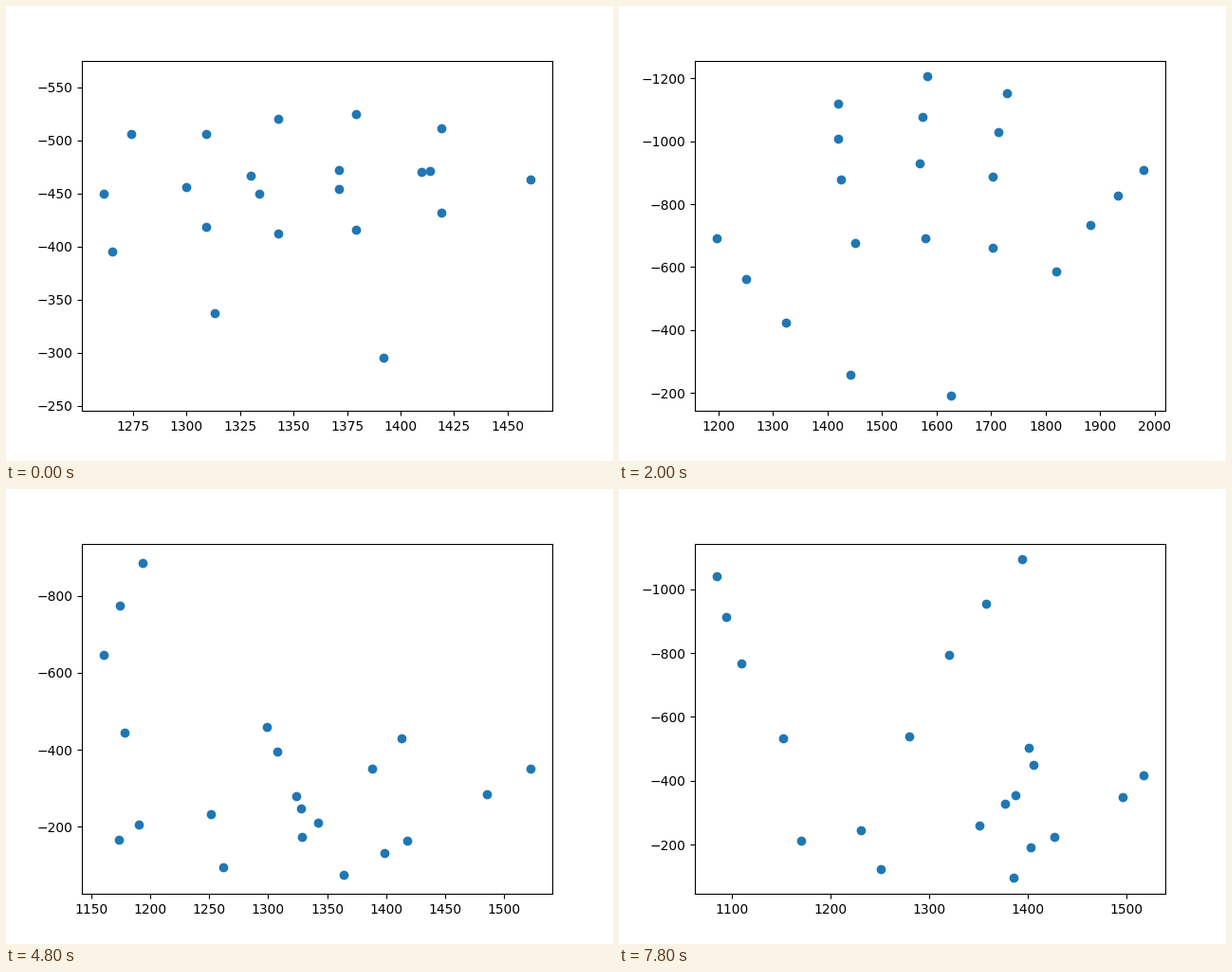
Animation, 640 px wide and 480 px high, one loop 8000 ms. Source, as a matplotlib script:

```python
import numpy as np
import matplotlib.pyplot as plt
from matplotlib.animation import FuncAnimation

FRAMES, STEP_MS = 40, 200

# Spacing of the four fingers from index (0) to little finger (1)
FIST, KNUCKLES, SPLAY = (0, .31, .64, 1), (0, .35, .68, 1), (0, .29, .55, 1)


def row(first, last, arch, spacing):
    """Four points in a line, the middle two raised by arch."""
    u = np.array(spacing)[:, None]
    return np.array(first) * (1 - u) + np.array(last) * u + np.outer((0, 1, 1, 0), (0, arch))


def bent_thumb(base, joint, tip, k=.45, t=.75):
    """Parabola through base (0), joint (k) and tip (1), with one more joint at t."""
    weights = np.array([(t - k) * (t - 1) / k, t * (1 - t) / (k * (1 - k)), t * (t - k) / (1 - k)])
    return np.array([base, joint, weights @ np.array([base, joint, tip]), tip])


def finger(root, tip, bow_up, bow_down):
    """Evenly drawn out when raised; folded over the palm when the tip is below the root."""
    raised = tip[1] > root[1]
    along = np.array((0, .46, .75, 1) if raised else (0, .3, .85, 1))
    bow = bow_up if raised else bow_down
    return root + np.outer(along, tip - root) + np.outer((0, 1, .6, 0), (bow, 0))


def landmarks(wrist, thumb, fingers):
    """21 points; heights are kept as negative numbers."""
    return np.vstack([wrist, bent_thumb(*thumb), *fingers]) * [1, -1]


def open_hand(wrist, thumb, knuckles, tips, bow_up=-12, bow_down=0):
    roots = row(*knuckles, 48, KNUCKLES)
    return landmarks(wrist, thumb,
                     [finger(r, t, bow_up, bow_down) for r, t in zip(roots, np.array(tips))])


def fist(wrist, thumb, knuckles, tips, height):
    """Middle joints stand straight above the tips, the last joints lean out."""
    side = np.sign(knuckles[0][0] - knuckles[1][0])
    roots = row(*knuckles, .07 * height, FIST)
    ends = row(*tips, -.12 * height, FIST)
    fingers = [[r, e + [0, height * w], e + [.1 * side * height, .43 * height], e]
               for r, e, w in zip(roots, ends, (1, 1.235, 1.235, .9))]
    return landmarks(wrist, thumb, fingers)


def moved(pose, dx, dy, scale):
    """Shift a hand and grow it about its wrist."""
    return pose[0] + (pose - pose[0]) * scale + [dx, dy]


far_fist = fist(
    wrist=(1392, 295), thumb=((1313, 337), (1265, 395), (1274, 506)),
    knuckles=((1330, 467), (1461, 463)), tips=((1309, 418), (1419, 432)), height=88)

other_fist = fist(
    wrist=(476, 196), thumb=((580, 311), (632, 433), (592, 602)),
    knuckles=((550, 527), (366, 464)), tips=((568, 471), (431, 411)), height=140)

palm = open_hand(
    wrist=(1608, 223), thumb=((1424, 267), (1293, 423), (1136, 673)),
    knuckles=((1415, 679), (1788, 605)),
    tips=row((1361, 1114), (1934, 940), 146, SPLAY))

tilted_palm = open_hand(
    wrist=(1644, 163), thumb=((1461, 249), (1353, 425), (1255, 711)),
    knuckles=((1484, 674), (1853, 567)),
    tips=row((1478, 1121), (2027, 878), 151, SPLAY))

pointing = open_hand(
    wrist=(1364, 75), thumb=((1262, 94), (1173, 166), (1251, 232)),
    knuckles=((1178, 444), (1523, 351)),
    tips=((1193, 886), (1328, 247), (1329, 173), (1399, 131)), bow_up=-25)

scissors = open_hand(
    wrist=(1293, 9), thumb=((1158, 67), (1075, 180), (1271, 206)),
    knuckles=((1047, 484), (1423, 394)),
    tips=((989, 981), (1236, 956), (1303, 293), (1353, 194)), bow_down=43)

wide_scissors = open_hand(
    wrist=(1386, 95), thumb=((1251, 123), (1170, 212), (1351, 259)),
    knuckles=((1152, 533), (1518, 417)),
    tips=((1084, 1041), (1394, 1093), (1377, 328), (1403, 191)), bow_down=12)

# Each take is a run of (step, pose) keys; a new take starts with a hard cut.
TAKES = [
    [(0, far_fist), (6, palm), (14, tilted_palm), (16, moved(tilted_palm, 25, 6, .98))],
    [(17, moved(other_fist, -14, 8, .97)), (19, other_fist),
     (21, moved(other_fist, 16, -6, 1.03))],
    [(22, moved(pointing, 12, -14, .95)), (24, pointing), (33, scissors), (39, wide_scissors)],
]


def pose_at(step):
    take = [t for t in TAKES if t[0][0] <= step][-1]
    for (a, start), (b, end) in zip(take, take[1:]):
        if step <= b:
            u = (step - a) / (b - a)
            u = u * u * (3 - 2 * u)
            return np.rint(start + (end - start) * u)


fig, ax = plt.subplots(figsize=(6.4, 4.8), dpi=100)


def draw(step):
    x, y = pose_at(step).T
    ax.clear()
    ax.scatter(x, y)
    ax.set_ylim(y.max() + 50, y.min() - 50)
    return []


anim = FuncAnimation(fig, draw, frames=FRAMES, interval=STEP_MS,
                     init_func=lambda: draw(0), repeat=True, repeat_delay=0)
plt.show()
```
